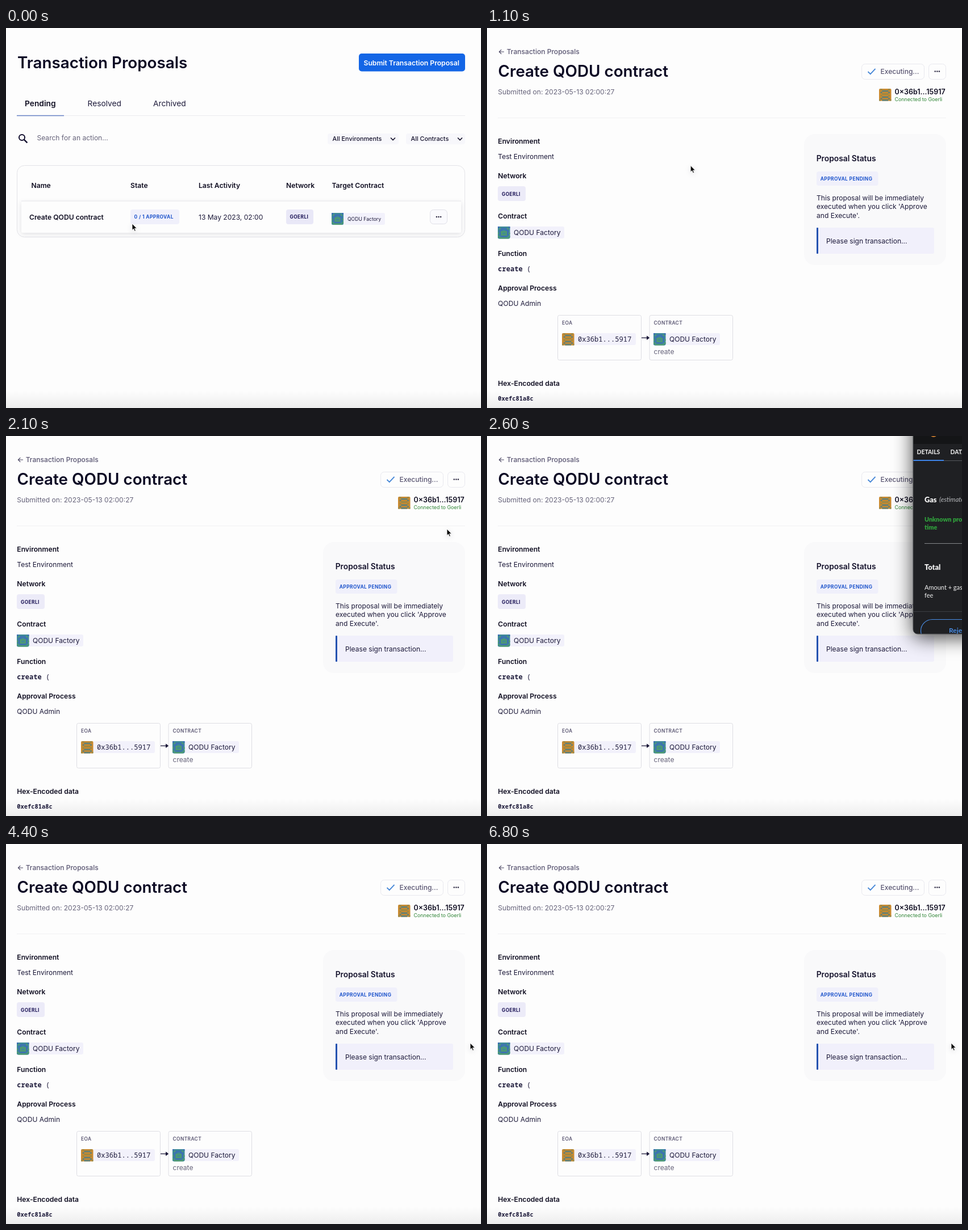
These frames come from a looping animation (836x670 px, 8000 ms). An HTML page:

```html
<!DOCTYPE html>
<html lang="en">
<head>
<meta charset="utf-8">
<title>Transaction proposal</title>
<style>
  html, body { margin: 0; width: 100%; height: 100%; overflow: hidden; background: #fdfdfd; }
  svg { display: block; width: 836px; height: 670px; }
  text { font-family: Inter, sans-serif; font-size: 12.05px; fill: #1d1a3a; font-optical-sizing: none; white-space: pre; }
  .h1 { font-size: 27.8px; font-weight: 600; fill: #0c0a24; }
  .h2 { font-size: 13.8px; font-weight: 600; fill: #15122c; }
  .b { font-size: 12.15px; font-weight: 600; fill: #100e22; }
  .tab { font-size: 13.75px; }
  .white { fill: #fff; }
  .med { font-weight: 500; fill: #5a5672; }
  .gray { fill: #66637a; }
  .drop { font-size: 10.85px; font-weight: 500; fill: #15122c; }
  .cap { font-size: 8.4px; font-weight: 700; letter-spacing: .4px; fill: #1c1456; }
  .blue { fill: #1f55cc; }
  .soft { font-weight: 600; fill: #5a5672; }
  .tiny { font-size: 8.65px; }
  .addr { font-size: 12.45px; }
  .green { font-size: 8.85px; fill: #2f8536; }
  .mono { font-family: "Noto Sans Mono", monospace; font-size: 12.1px; }
  .hex { font-size: 10.4px; font-weight: 600; }
  #popup text { font-family: Lato, sans-serif; font-size: 11px; fill: #f2f2f2; }
  #popup .head { font-size: 10.4px; font-weight: 700; }
  #popup .big { font-size: 12.8px; font-weight: 900; }
  #popup .it { font-size: 11.5px; font-style: italic; fill: #b5b7ba; }
  #popup .ok { font-weight: 900; font-size: 10.8px; fill: #30a23c; }
  #popup .link { font-weight: 700; font-size: 12px; fill: #4a8fe8; }
  .lift { filter: drop-shadow(0 2px 4px rgba(20, 20, 50, .13)); }
  .float { filter: drop-shadow(0 6px 17px rgba(0, 0, 0, .75)); }
</style>
</head>
<body>
<svg id="stage" viewBox="0 0 836 670" xmlns="http://www.w3.org/2000/svg"></svg>
<script>
const LOOP = 8000, STEP = 100;

const text = (x, y, s, cls = '') => `<text x="${x}" y="${y}" class="${cls}">${s}</text>`;
const rect = (x, y, w, h, r, fill, more = '') =>
  `<rect x="${x}" y="${y}" width="${w}" height="${h}" rx="${r}" fill="${fill}" ${more}/>`;
const path = (d, color, w = 1, more = '') =>
  `<path d="${d}" fill="none" stroke="${color}" stroke-width="${w}" ${more}/>`;
const box = (x, y, w, h, r, color, fill = 'none') =>
  rect(x + .5, y + .5, w - 1, h - 1, r, fill, `stroke="${color}"`);
const chevron = (x, y) => path(`M${x - 4} ${y - 2}l4 4l4-4`, '#15122c', 1.6);
const dots = (x, y) => [-3.6, 0, 3.6].map(d => `<circle cx="${x + d}" cy="${y}" r="1.25" fill="#2a2740"/>`).join('');

// Identicons: 8 rows of 4 cells, mirrored.
const TEAL = { colors: ['#3f8a98', '#3c70b4', '#4f9a72'], rows: '1000 0211 0110 0122 2120 0122 2011 0222' };
const AMBER = { colors: ['#c98a30', '#5f8078', '#9a8844'], rows: '0200 0011 0100 0022 0200 0011 0100 2011' };
function icon({ colors, rows }, x, y, size = 21.5) {
  const c = size / 8;
  let out = rect(x, y, size, size, 2, colors[0]);
  rows.split(' ').forEach((row, j) => {
    [...row, ...[...row].reverse()].forEach((k, i) => {
      if (k > 0) out += rect(x + i * c, y + j * c, c + .1, c + .1, 0, colors[k]);
    });
  });
  return out;
}

const list = [
  text(20, 70.5, 'Transaction Proposals', 'h1'),
  rect(621, 45, 187, 31.5, 5, '#1466e6'),
  text(629.5, 65.8, 'Submit Transaction Proposal', 'b white'),
  text(33, 137.8, 'Pending', 'b tab'),
  text(143.5, 137.8, 'Resolved', 'tab'),
  text(259, 137.8, 'Archived', 'tab'),
  path('M102 154.5H808', '#ebebef'),
  path('M19 154.5H102', '#6680c4', 1.6),
  '<circle cx="28" cy="193" r="5" fill="none" stroke="#0f0c2c" stroke-width="2"/>',
  path('M31.6 196.6L37.4 202.4', '#0f0c2c', 2.3),
  text(54.5, 197.8, 'Search for an action...', 'gray'),
  rect(566, 186, 125, 19, 4, '#f7f7fb'),
  text(574.5, 199.3, 'All Environments', 'drop'), chevron(681, 195.5),
  rect(704, 186, 104, 19, 4, '#f7f7fb'),
  text(712.5, 199.3, 'All Contracts', 'drop'), chevron(799, 195.5),
  box(19, 242, 789, 127, 13, '#e3e3e7'),
  rect(27, 306, 774, 55, 2, '#fdfdfd', 'class="lift"'),
  path('M27 305H801', '#e9e9ed'),
  text(44.5, 281.8, 'Name', 'b'), text(219, 281.8, 'State', 'b'),
  text(339, 281.8, 'Last Activity', 'b'), text(493, 281.8, 'Network', 'b'),
  text(573.5, 281.8, 'Target Contract', 'b'),
  text(41, 337.8, 'Create QODU contract', 'b'),
  rect(219, 320, 86, 26, 4, '#f0f0fb'), text(225.5, 336.3, '0 / 1 APPROVAL', 'cap blue'),
  text(339, 337.8, '13 May 2023, 02:00'),
  rect(493, 320, 48, 26, 4, '#e9e8f7'), text(499.5, 336.3, 'GOERLI', 'cap'),
  rect(594, 326, 73, 21, 3, '#f2f1fb'), icon(TEAL, 573, 326, 21),
  text(601, 339.8, 'QODU Factory', 'tiny'),
  box(746, 320, 31, 26, 6, '#e0e0e8', '#fafafd'), dots(761.5, 333),
].join('');

const loading = path('M402.6 122.8A13.2 13.2 0 0 0 421.4 122.8', '#b6b0da', 1.7, 'id="spinner"')
  + text(310.5, 155.3, 'Loading transaction proposal data...');

const detail = [
  path('M30 42H21.5M25.3 38.2L21.5 42L25.3 45.8', '#4a4662', 1.2),
  text(34.7, 45.8, 'Transaction Proposals', 'med'),
  text(19.5, 86.2, 'Create QODU contract', 'h1'),
  text(19.3, 117, 'Submitted on: 2023-05-13 02:00:27', 'gray'),
  path('M19 158.5H808', '#f0f0f3'),
  box(659, 63, 111, 28, 6, '#e9e9ef'),
  path('M670.5 77L674.8 81.2L683.5 71.8', '#4586d6', 1.8),
  text(692.5, 81.3, 'Executing...', 'med'),
  box(777, 63, 31, 28, 6, '#e9e9ef'), dots(792.3, 76.5),
  icon(AMBER, 690, 107),
  text(717.5, 116.8, '0×36b1...15917', 'b addr'),
  text(717.5, 128.8, 'Connected to Goerli', 'green'),

  text(19.3, 204, 'Environment', 'b'), text(19.3, 231, 'Test Environment'),
  text(19.3, 265, 'Network', 'b'),
  rect(19, 279, 49, 26, 4, '#ecebf8'), text(26, 295.6, 'GOERLI', 'cap'),
  text(19.3, 336, 'Contract', 'b'),
  rect(40, 350, 96, 21, 3, '#f2f1fb'), icon(TEAL, 19, 350), text(47, 365.4, 'QODU Factory'),
  text(19.3, 402, 'Function', 'b'),
  text(19.3, 428.8, '<tspan font-weight="600">create</tspan> (', 'mono'),
  text(19.3, 463, 'Approval Process', 'b'), text(19.3, 490, 'QODU Admin'),

  box(124, 506, 148, 80, 3, '#dedee4'), text(132, 522.8, 'EOA', 'cap soft'),
  rect(153, 538, 109, 21, 3, '#f2f1fb'), icon(AMBER, 132, 538),
  text(160, 553.4, '0x36b1...5917', 'mono'),
  path('M272 546.3H283', '#1d1a3a', 1.3), '<path d="M281 542.6L286.6 546.3L281 550z" fill="#1d1a3a"/>',
  box(285.5, 506, 147.5, 80, 3, '#dedee4'), text(293.5, 522.8, 'CONTRACT', 'cap soft'),
  rect(314, 538, 96, 21, 3, '#f2f1fb'), icon(TEAL, 293, 538),
  text(321, 553.4, 'QODU Factory'), text(293.5, 575.4, 'create', 'gray'),
  text(19.3, 631, 'Hex-Encoded data', 'b'), text(19.3, 657.4, '0xefc81a8c', 'mono hex'),

  rect(558, 187, 250, 231, 19, '#f9f9fa'),
  text(579.7, 235.4, 'Proposal Status', 'h2'),
  rect(580, 253, 108.5, 25, 4, '#f0f0fb'), text(586.7, 269.4, 'APPROVAL PENDING', 'cap blue'),
  text(580, 303.6, 'This proposal will be immediately'),
  text(580, 319, "executed when you click 'Approve"),
  text(580, 334.6, "and Execute'."),
  rect(580, 352, 207, 46, 3, '#f1f0fb'), rect(580, 352, 3, 46, 1, '#2453b0'),
  text(597, 379.6, 'Please sign transaction...'),
].join('');

const tooltip = rect(630, 86, 118, 56, 4, '#fefefe', 'class="lift"') + text(651.5, 118.3, 'Please wait...');

const popup = [
  rect(750, -200, 400, 549, 8, '#1f2023', 'class="float"'),
  '<g clip-path="url(#frame)"><g id="scroll">',
  rect(750, -300, 400, 314, 0, '#141517'),
  '<circle cx="786" cy="-4" r="6" fill="#c77a2e"/>',
  text(756.5, 32, 'DETAILS', 'head'), text(815.5, 32, 'DATA', 'head'),
  path('M750 43.5H900', '#55585d'), path('M750 43H804', '#3d83e6', 2),
  text(770, 116.5, 'Gas', 'big'), text(796, 116, '(estimated)', 'it'),
  text(770, 150.5, 'Unknown processing', 'ok'), text(770, 165, 'time', 'ok'),
  path('M770 189.5H900', '#85878b'),
  text(770, 236, 'Total', 'big'),
  text(770, 270.5, 'Amount + gas'), text(770, 285, 'fee'),
  path('M750 309.5H900', '#3b3e42'),
  rect(763.5, 323.5, 150, 40, 20, 'none', 'stroke="#4a8fe8" stroke-width="1.2"'),
  text(813, 347, 'Reject', 'link'),
  '</g></g>',
  rect(750, -200, 400, 549, 8, 'none', 'stroke="#4a4c50"'),
].join('');

const pointer = '<path class="lift" d="M0 0V11.4L2.6 9L4.4 13.2L6.3 12.4L4.5 8.3H8.2Z" fill="#0a0a0a" stroke="#fff" stroke-width=".8"/>';

const group = (id, body) => `<g id="${id}">${body}</g>`;
const el = id => document.getElementById(id);
el('stage').innerHTML = `<defs>
  <linearGradient id="fade" x1="0" y1="0" x2="0" y2="1">
    <stop offset="0" stop-color="#fdfdfd"/><stop offset="1" stop-color="#ededed"/>
  </linearGradient>
  <clipPath id="frame"><rect x="750" y="-200" width="400" height="549" rx="8"/></clipPath></defs>`
  + rect(0, 0, 836, 670, 0, '#fdfdfd') + rect(0, 640, 836, 30, 0, 'url(#fade)')
  + group('list', list) + group('loading', loading) + group('detail', detail)
  + group('tooltip', tooltip) + group('popup', popup) + group('cursor', pointer);

// Visible spans in ms, then [time, ...values] keys.
const SPANS = {
  list: [[0, 700]], loading: [[700, 1000]], detail: [[1000, LOOP]],
  tooltip: [[1400, 2100]], popup: [[2200, 3000]], cursor: [[0, 2300], [3200, LOOP]],
};
const CURSOR = [[0, 222, 345], [500, 165, 332], [900, 165, 332], [1400, 714, 78],
  [1900, 714, 78], [2300, 838, 250], [3100, 838, 250], [3200, 817, 351]];
const SCROLL = [[2400, 90], [2600, 0], [2800, -34]];

const ease = p => p * p * (3 - 2 * p);
function at(keys, t) {
  const i = keys.findIndex(k => k[0] > t);
  if (i < 0) return keys[keys.length - 1].slice(1);
  if (i === 0) return keys[0].slice(1);
  const a = keys[i - 1], b = keys[i], p = ease((t - a[0]) / (b[0] - a[0]));
  return a.slice(1).map((v, n) => v + (b[n + 1] - v) * p);
}

function draw(now) {
  const t = Math.floor((now % LOOP) / STEP) * STEP;
  for (const id in SPANS) {
    el(id).style.display = SPANS[id].some(([a, b]) => t >= a && t < b) ? '' : 'none';
  }
  el('cursor').setAttribute('transform', `translate(${at(CURSOR, t)})`);
  el('scroll').setAttribute('transform', `translate(0 ${at(SCROLL, t)})`);
  el('spinner').setAttribute('transform', `rotate(${(t - 700) * .36} 412 113.5)`);
}

const start = performance.now();
function tick() {
  draw(performance.now() - start);
  requestAnimationFrame(tick);
}
tick();
</script>
</body>
</html>
```
